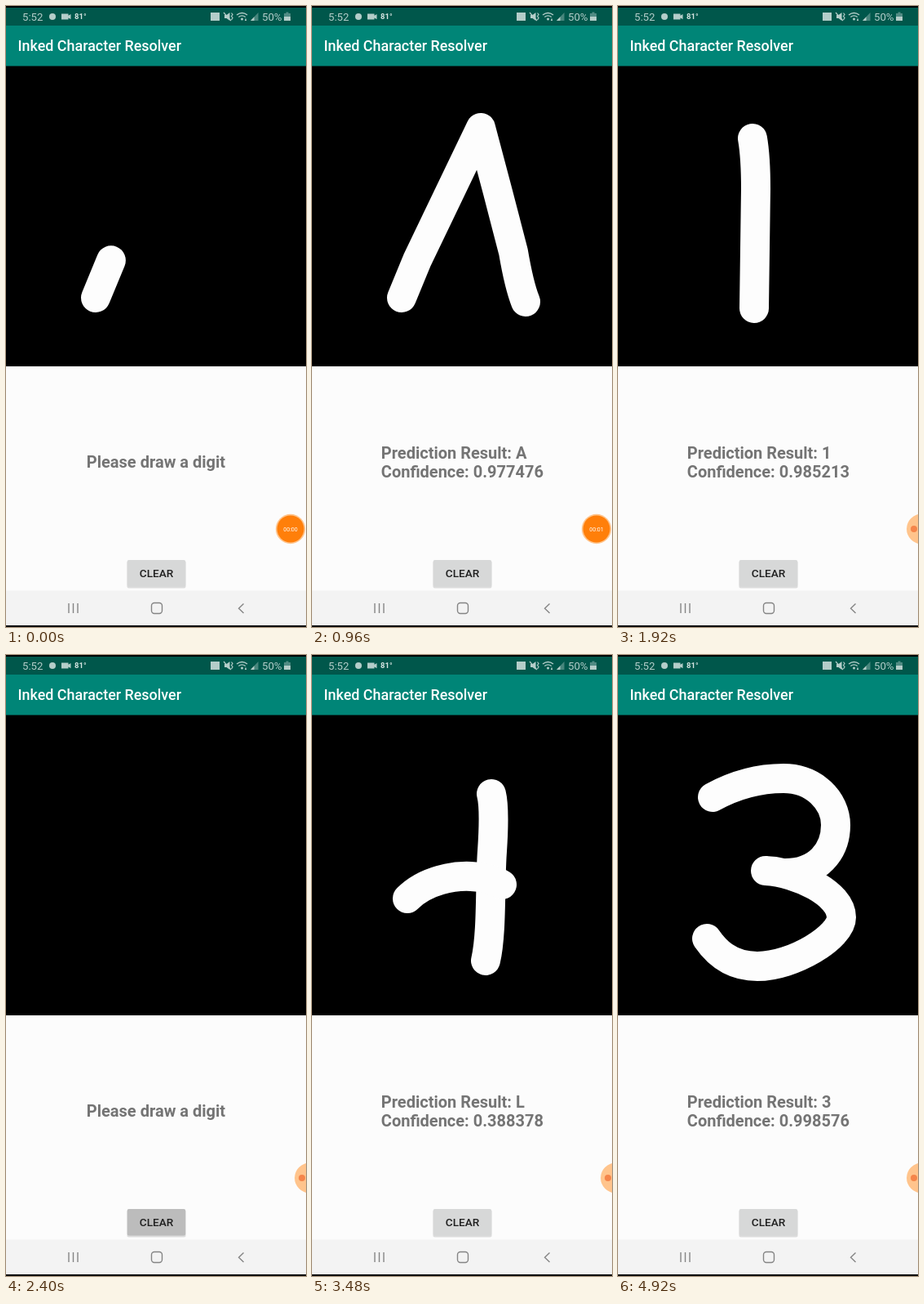
Animation, 368 px wide and 760 px high, one loop 5400 ms. Source, as an HTML page:

```html
<!DOCTYPE html>
<html lang="en">
<head>
<meta charset="utf-8">
<title>Inked Character Resolver</title>
<style>
  html, body { margin: 0; width: 100%; height: 100%; overflow: hidden; background: #000; }
  svg { display: block; width: 368px; height: 760px; font-family: Roboto, "Open Sans", sans-serif; }
  .ink { fill: none; stroke: #fdfdfd; stroke-width: 36; stroke-linecap: round; stroke-linejoin: round; }
  .status { fill: #b4cdc9; }
  .nav { fill: none; stroke: #858585; stroke-width: 1.4; }
  .message { font-size: 20px; font-weight: 700; fill: #747474; }
</style>
</head>
<body>
<svg viewBox="0 0 368 760">
  <defs>
    <clipPath id="pad"><rect y="74" width="368" height="367"/></clipPath>
  </defs>
  <rect width="368" height="760"/>
  <rect y="2" width="368" height="21.5" fill="#00574b"/>
  <rect y="23.5" width="368" height="50" fill="#008577"/>
  <rect y="441" width="368" height="275" fill="#fcfcfc"/>
  <rect y="715.5" width="368" height="42.5" fill="#f3f3f3"/>

  <g class="status">
    <text x="20" y="17.8" font-size="13.2">5:52</text>
    <circle cx="57" cy="13" r="4"/>
    <path d="M68 9.5h8.5v2.2l3-1.7v6.3l-3-1.7v1.9H68z"/>
    <text x="84" y="16.3" font-size="9.5" font-weight="700" fill="#d5e4e1">81°</text>
    <rect x="251" y="8" width="11" height="10"/>
    <path d="M268 11h2.5l4-3v10l-4-3H268z"/>
    <path d="M267 8l9 10M276.5 8.5l1.5 2-1.5 2 1.5 2-1.5 2.5" fill="none" stroke="#b4cdc9" stroke-width="1.2"/>
    <path d="M283 11q6.500-5 13 0M285.300 13.500q4.200-3.200 8.400 0" fill="none" stroke="#b4cdc9" stroke-width="1.4"/>
    <circle cx="289.500" cy="16" r="1.500"/>
    <path d="M294 14.500l1.200 3.500h-2.400z"/>
    <path d="M309.500 8v10H300z" opacity=".4"/>
    <path d="M304.500 13.300V18H300z"/>
    <text x="314" y="17.800" font-size="13.200">50%</text>
    <path d="M343.500 7.500h3V9h2.500v9h-8V9h2.500z" opacity=".45"/>
    <path d="M341 13h8v5h-8z"/>
  </g>
  <text x="14.500" y="55" font-size="17.900" font-weight="500" fill="#fff">Inked Character Resolver</text>

  <g class="ink" clip-path="url(#pad)">
    <path id="caret" d="M110 357L129 311L207 149L228 228L247 301Q254 342 262 362"/>
    <path id="bar" d="M165 162Q169 185 169 224L167 370"/>
    <path id="stem" d="M220 170Q224.500 188 221 240C218 280 221 340 213 374"/>
    <path id="arch" d="M117 298C140 275 175 270 195 271S225 276 233 281"/>
    <path id="three" d="M116 174Q158 151 203 151C240 151 267 178 267 208C267 240 245 268 203 267Q192 264 181 264C220 266 274 292 274 321C274 345 215 381 171 381C135 381 118 360 109 347"/>
  </g>

  <text class="message" id="hint" x="98.800" y="565">Please draw a digit</text>
  <g class="message" id="result">
    <text x="84.800" y="553.500" id="label"></text>
    <text x="84.800" y="576.800" id="score"></text>
  </g>

  <rect x="148.500" y="679" width="72" height="33.500" rx="2" fill="#000" opacity=".13"/>
  <rect id="button" x="148.700" y="678" width="71.500" height="32.500" rx="2"/>
  <text x="184.500" y="699" font-size="13.600" font-weight="500" text-anchor="middle" fill="#202020">CLEAR</text>

  <g id="bubble">
    <circle id="halo" cy="640" r="18.200" fill="#ffc48c"/>
    <circle id="disc" cy="640"/>
    <text id="clock" y="642.500" font-size="7" text-anchor="middle" fill="#fff"></text>
  </g>

  <g class="nav">
    <path d="M77 731v12M82.500 731v12M88 731v12"/>
    <rect x="178.500" y="730.500" width="13" height="13" rx="3.500"/>
    <path d="M291.500 731.500l-6 5.800 6 5.800"/>
  </g>
</svg>
<script>
  const STEP = 120, COUNT = 45;
  const $ = id => document.getElementById(id);
  const set = (el, attrs) => { for (const k in attrs) el.setAttribute(k, attrs[k]); };

  // start/clear ticks and the drawn share on each tick after the start
  const strokes = [
    { id: "caret", start: 0, clear: 9, parts: [.11, .54, 1] },
    { id: "bar", start: 11, clear: 20, parts: [.02, .3, .6, .85, 1] },
    { id: "stem", start: 24, clear: 35, parts: [.1, .6, 1] },
    { id: "arch", start: 28, clear: 35, parts: [.5, 1] },
    { id: "three", start: 37, clear: COUNT, parts: [.04, .25, .48, .78, 1] }
  ];
  const results = [
    { from: 3, to: 9, sign: "A", score: "0.977476" },
    { from: 16, to: 20, sign: "1", score: "0.985213" },
    { from: 27, to: 35, sign: "L", score: "0.388378" },
    { from: 41, to: COUNT, sign: "3", score: "0.998576" }
  ];
  const pressed = { 9: "#c4c4c4", 20: "#bcbcbc", 35: "#c4c4c4" };

  strokes.forEach(s => { s.el = $(s.id); s.length = s.el.getTotalLength(); });

  function drawBubble(n) {
    const docked = n >= 16;
    const slide = Math.min(1, Math.max(0, (n - 9) / 2));
    const x = 349 + 12 * slide;
    $("halo").style.display = slide === 0 || docked ? "" : "none";
    set($("halo"), { cx: docked ? 372.5 : x, r: docked ? 18.5 : 18.2 });
    set($("disc"), docked
      ? { cx: 363, r: 4, fill: "#f5854a" }
      : { cx: x, r: 16.5 - 2.2 * slide, fill: slide ? "#fcb97b" : "#ff7f0a" });
    set($("clock"), { x });
    $("clock").textContent = docked ? "" : "00:0" + Math.floor(n / 6);
  }

  function draw(n) {
    for (const s of strokes) {
      const on = n >= s.start && n < s.clear;
      s.el.style.display = on ? "" : "none";
      if (!on) continue;
      const part = s.parts[Math.min(n - s.start, s.parts.length - 1)];
      s.el.style.strokeDasharray = part < 1 ? `${part * s.length} ${2 * s.length}` : "none";
    }
    const r = results.find(r => n >= r.from && n < r.to);
    $("hint").style.display = r ? "none" : "";
    $("result").style.display = r ? "" : "none";
    if (r) {
      $("label").textContent = "Prediction Result: " + r.sign;
      $("score").textContent = "Confidence: " + r.score;
    }
    set($("button"), { fill: pressed[n] || "#d7d8d8" });
    drawBubble(n);
  }

  const t0 = performance.now();
  let last = -1;
  function frame() {
    const n = Math.floor((performance.now() - t0) / STEP) % COUNT;
    if (n !== last) draw(last = n);
    requestAnimationFrame(frame);
  }
  frame();
</script>
</body>
</html>
```
